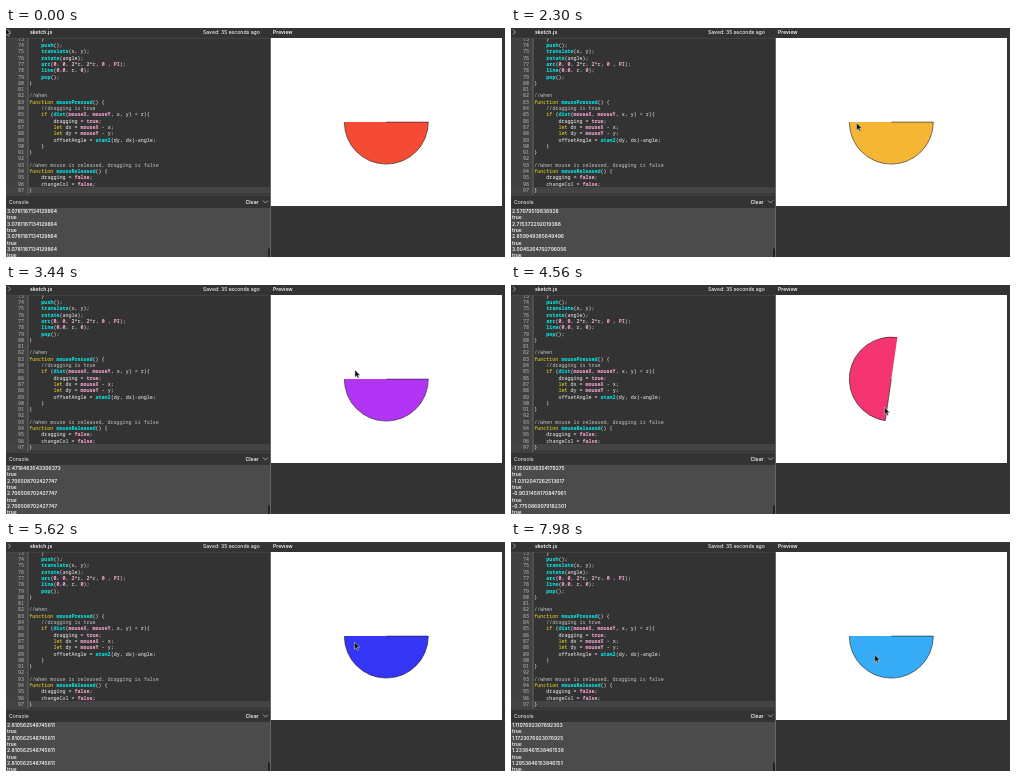
Animation, 499 px wide and 229 px high, one loop 8 s. Source, as an HTML page:

```html
<!DOCTYPE html>
<html lang="en">
<head>
<meta charset="utf-8">
<title>Rotating half disc</title>
<style>
  html, body { margin: 0; width: 100%; height: 100%; overflow: hidden; background: #333; }
  svg { display: block; }
  text { white-space: pre; fill: #f4f4f4; }
  .ui { font: 600 5.1px Inter, sans-serif; }
  .code { font: 500 5.02px "Noto Sans Mono", monospace; }
  .log { font: 600 4.95px Inter, sans-serif; }
  .num { fill: #bbb; font-weight: 400; text-anchor: end; }
  .comment { fill: #c1c1c1; }
  .keyword { fill: #f5dc23; }
  .call { fill: #00f0f0; font-weight: 700; }
  .value { fill: #ffa9d9; font-weight: 700; }
  .chevron { fill: none; stroke: #bbb; stroke-width: .8; }
</style>
</head>
<body>
<svg width="499" height="229" viewBox="0 0 499 229">
  <rect width="499" height="229" fill="#333"/>
  <rect y="10" width="22" height="157" fill="#414141"/>
  <rect y="159" width="264" height="6.5" fill="#444"/>
  <rect x="21.5" y="10" width="1" height="157" fill="#666"/>
  <g id="editor"></g>
  <rect width="264" height="10" fill="#333"/>
  <path d="M0 10.3H264M0 167.3H264" stroke="#505050" stroke-width=".6"/>
  <path class="chevron" d="M2 1.5l2.5 2.5l-2.5 2.5"/>
  <text class="ui" x="24" y="6">sketch.js</text>
  <text class="ui" x="197" y="6" style="font-weight:500">Saved: 35 seconds ago</text>
  <text class="ui" x="267" y="6">Preview</text>
  <text class="ui" x="3" y="175.8" style="font-weight:400">Console</text>
  <text class="ui" x="239.5" y="175.8">Clear</text>
  <path class="chevron" d="M257 172.5l2.5 2.5l2.5 -2.5"/>
  <rect y="180" width="265" height="49" fill="#4b4b4b"/>
  <g id="log"></g>
  <rect x="262" y="220.5" width="3" height="8.5" fill="#222"/>
  <rect x="264" y="10" width="1" height="219" fill="#666"/>
  <rect x="265" y="10" width="231" height="168" fill="#fff"/>
  <g id="disc" stroke="#111" stroke-width=".55">
    <path id="half" d="M42 0A42 42 0 0 1 -42 0"/>
    <path d="M0 0H42"/>
  </g>
  <path id="pointer" d="M-.7 0v7.4l1.7 -1.5l1.2 2.5l1.2 -.6l-1.1 -2.4h2.3z" fill="#111" stroke="#ddd" stroke-width=".5"/>
</svg>
<script>
const LOOP = 8000, STEP = 20, LOG_LAG = 400;
const CENTER = [380.3, 94.1];
const $ = id => document.getElementById(id);

function add(parent, tag, attrs = {}, text = '') {
  const node = document.createElementNS('http://www.w3.org/2000/svg', tag);
  for (const key in attrs) node.setAttribute(key, attrs[key]);
  node.textContent = text;
  return parent.appendChild(node);
}

const source = `    }
    push();
    translate(x, y);
    rotate(angle);
    arc(0, 0, 2*r, 2*r, 0 , PI);
    line(0,0, r, 0);
    pop();
}

//when
function mousePressed() {
    //dragging is true
    if (dist(mouseX, mouseY, x, y) < r){
        dragging = true;
        let dx = mouseX - x;
        let dy = mouseY - y;
        offsetAngle = atan2(dy, dx)-angle;
    }
}

//when mouse is released, dragging is false
function mouseReleased() {
    dragging = false;
    changeCol = false;
}`;

const tokens = [
  ['comment', /^\/\//],
  ['keyword', /^(function|let|if)$/],
  ['call', /^(push|translate|rotate|arc|line|pop|dist|atan2|mousePressed|mouseReleased)$/],
  ['value', /^(\d+|PI|mouse[XY]|true|false)$/]
];

source.split('\n').forEach((line, i) => {
  const y = 12.7 + i * 6.3;
  add($('editor'), 'text', { class: 'code num', x: 18, y }, 73 + i);
  const row = add($('editor'), 'text', { class: 'code', x: 23.3, y });
  for (const part of line.match(/\/\/.*|\w+|\W/g) || []) {
    const kind = tokens.find(([, test]) => test.test(part));
    add(row, 'tspan', kind ? { class: kind[0] } : {}, part);
  }
});

const logRows = Array.from({ length: 8 }, (_, i) =>
  add($('log'), 'text', { class: 'log', x: 1, y: 185 + i * 6.3 }, 'true'));

// Each drag turns clockwise from one angle to another; the disc springs back on release.
const rest = { release: 500, to: 0.87, rTo: 25.5, restHue: 7, lastLog: 3.0781187134129864 };
const drags = [
  { press: 1050, release: 1900, from: -3.14, to: 3.0045264792796056, rFrom: 33, rTo: 35, grip: 0, hue: 22, restHue: 40 },
  { press: 2500, release: 3000, from: -3.16, to: 2.706508702427747, rFrom: 34, rTo: 32, grip: 0, hue: 312, restHue: 279 },
  { press: 3850, release: 4720, from: -2.76, to: 2.810562548745611, rFrom: 32, rTo: 34, grip: -0.07, hue: 341, restHue: 240 },
  { press: 6080, release: 7900, from: -3.32, to: 2.28, rFrom: 31.6, rTo: 24.5, grip: 0.1, hue: 159, restHue: 203 }
];

const mix = (a, b, p) => a + (b - a) * p;
const progress = (t, from, to) => Math.min(1, Math.max(0, (t - from) / (to - from)));
const easeOut = p => 1 - (1 - p) ** 3;
const lastDrag = t => drags.findLast(d => t >= d.press);

function dragAngle(drag, t) {
  return t >= drag.release ? drag.to : mix(drag.from, drag.to, progress(t, drag.press, drag.release));
}

function pointerAt(t) {
  const last = lastDrag(t) || rest;
  if (t < last.release) {
    const p = progress(t, last.press, last.release);
    return [dragAngle(last, t), mix(last.rFrom, last.rTo, p) - 9 * Math.sin(Math.PI * p)];
  }
  const next = drags.find(d => d.press > t);
  if (!next) return [last.to, last.rTo];
  const p = easeOut(progress(t, last.release, next.press));
  return [mix(last.to, next.from + 2 * Math.PI, p), mix(last.rTo, next.rFrom, p)];
}

function loggedAngle(t) {
  const drag = lastDrag(t - LOG_LAG);
  return drag ? dragAngle(drag, t - LOG_LAG) : rest.lastLog;
}

function draw(time) {
  const t = Math.floor(time % LOOP / STEP) * STEP;
  const last = lastDrag(t) || rest;
  const dragging = last !== rest && t < last.release;
  const [angle, radius] = pointerAt(t);
  const turn = dragging ? (angle + last.grip) * 180 / Math.PI : 0;
  const x = CENTER[0] + radius * Math.cos(angle), y = CENTER[1] + radius * Math.sin(angle);
  $('disc').setAttribute('transform', `translate(${CENTER}) rotate(${turn})`);
  $('half').setAttribute('fill', `hsl(${dragging ? last.hue : last.restHue} 91% 58.5%)`);
  $('pointer').setAttribute('transform', `translate(${x} ${y})`);
  for (let i = 0; i < 4; i++) {
    logRows[i * 2].textContent = loggedAngle(t - (3 - i) * STEP);
  }
}

const start = performance.now();
function tick() {
  draw(performance.now() - start);
  requestAnimationFrame(tick);
}
tick();
</script>
</body>
</html>
```
